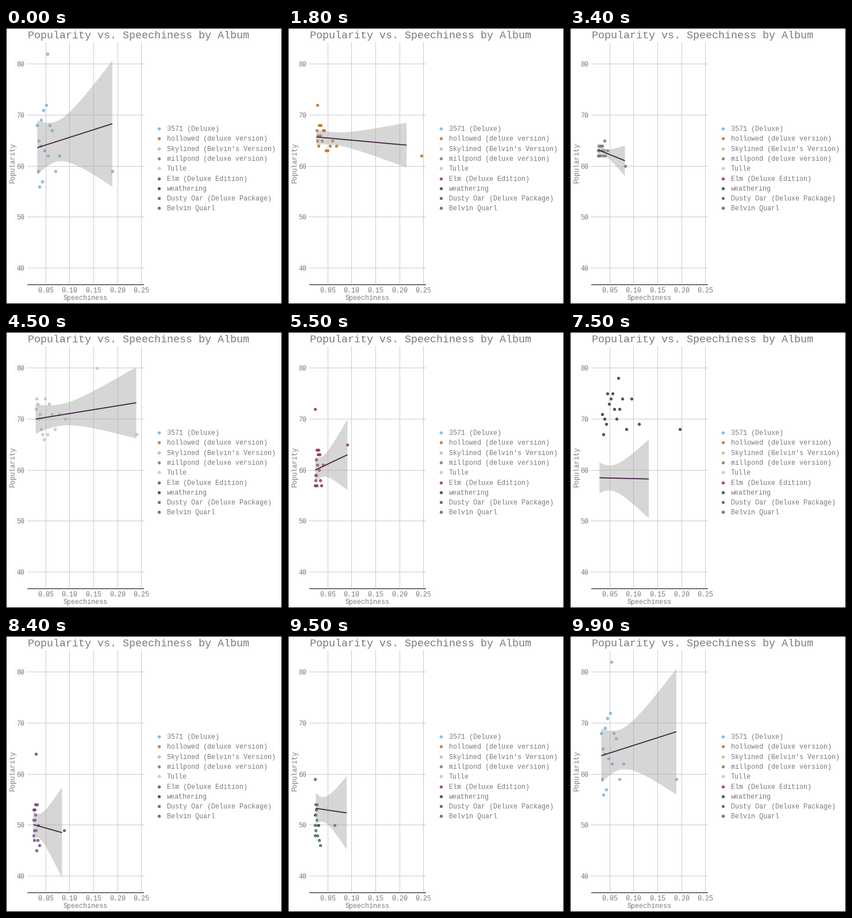
Animation of 480 by 480 pixels, one loop 10 s. Source, as a matplotlib script:

```python
import numpy as np
import matplotlib as mpl
import matplotlib.pyplot as plt
from matplotlib.animation import FuncAnimation
from matplotlib.colors import to_rgb
from matplotlib.patches import Polygon

SIZE, DPI = 480, 72
FRAMES, STEP = 100, 100
ROWS, TRACKS = 80, 17
LEFT, RIGHT, TOP, BOTTOM = 37, 240, 25, 446
TEXT, GRID, LINE = "#807680", "#cbcbcb", "#432147"

mpl.rcParams["font.family"] = "Liberation Mono"
rng = np.random.default_rng(8)


def px(speech):
    return 69.3 + (np.asarray(speech) - 0.05) * 832


def py(pop):
    return 62.7 + (80 - np.asarray(pop)) * 8.87


albums = []


def album(name, color, start, peak, end, trend, mean, waist, half):
    """Add a trend with its confidence band and seeded dots around it.

    start: lowest speechiness; peak, end: highest and rightmost dot;
    trend: popularity at both ends of the line; mean: where the band is
    narrowest, as a share of its width; waist, half: half height of the
    band there and at the right end.
    """
    width = end[0] - start
    u = np.linspace(0, 1, ROWS)
    mid = trend[0] + (trend[1] - trend[0]) * u
    reach = (u - mean) / (1 - mean)
    band = np.sqrt(waist**2 + (half**2 - waist**2) * reach**2)
    fit = np.array([start + width * u, mid, mid - band, mid + band])

    # exponential crowd near the left end, popularity in whole numbers
    crowd = -np.log(1 - np.linspace(0, 0.88, TRACKS - 2))
    x = start + 0.6 * mean * width * crowd
    sd = waist * np.sqrt(TRACKS) / 2.13
    noise = rng.permutation(np.linspace(-1, 1, len(x))) * sd
    y = np.minimum(np.round(np.interp(x, fit[0], mid) + noise), peak[1])
    albums.append(dict(name=name, color=color, fit=fit,
                       x=np.r_[x, peak[0], end[0]],
                       y=np.r_[y, peak[1], end[1]]))


album("3571 (Deluxe)", "#7fc0ea", 0.032, (0.0535, 82), (0.189, 59),
      trend=(63.6, 68.3), mean=0.235, waist=3.95, half=12.35)
album("hollowed (deluxe version)", "#cd7a1c", 0.0263, (0.0275, 72),
      (0.245, 62), trend=(65.7, 63.4), mean=0.15, waist=1.2, half=4.3)
album("Skylined (Belvin's Version)", "#e0c78a", 0.0245, (0.0312, 76),
      (0.0628, 70), trend=(65.7, 67.6), mean=0.25, waist=1.3, half=4.9)
album("millpond (deluxe version)", "#808080", 0.025, (0.039, 65),
      (0.0815, 60), trend=(63.2, 61.05), mean=0.27, waist=0.75, half=3)
album("Tulle", "#d8cdec", 0.0287, (0.157, 80), (0.239, 67),
      trend=(70, 73.2), mean=0.23, waist=2.1, half=7)
album("Elm (Deluxe Edition)", "#9c2f50", 0.0235, (0.0235, 72), (0.091, 65),
      trend=(60, 63), mean=0.19, waist=2, half=6.95)
album("weathering", "#383838", 0.0345, (0.068, 78), (0.1957, 68),
      trend=(71.3, 72.8), mean=0.37, waist=2.1, half=4.9)
album("Dusty Oar (Deluxe Package)", "#7840a0", 0.0242, (0.029, 64),
      (0.0887, 49), trend=(49.95, 48.55), mean=0.15, waist=2.4, half=9.65)
album("Belvin Quarl", "#427350", 0.023, (0.023, 59), (0.0645, 50),
      trend=(50.7, 48.4), mean=0.2, waist=2.05, half=5.9)

# (first frame, steps) of the change away from each album
CHANGES = [(6, 6), (18, 6), (30, 5), (41, 5), (51, 5),
           (62, 5), (73, 5), (84, 5), (95, 5)]

fig = plt.figure(figsize=(SIZE / DPI, SIZE / DPI), dpi=DPI, facecolor="white")
ax = fig.add_axes([0, 0, 1, 1])
ax.set(xlim=(0, SIZE), ylim=(SIZE, 0))
ax.axis("off")


def rule(xs, ys, color):
    ax.plot(xs, ys, color=color, lw=1, snap=False, solid_capstyle="butt",
            solid_joinstyle="miter", zorder=1)


def label(x, y, text, size=11.67, **kw):
    ax.text(x, y, text, size=size, color=TEXT, va="baseline", **kw)


def paint(mark, color):
    rgb = np.array(to_rgb(color))
    mark.set_markerfacecolor((*rgb, 0.8))
    mark.set_markeredgecolor((*(rgb * 0.8), 0.8))


def dots(color, x=(), y=()):
    mark, = ax.plot(x, y, "o", ms=4.2, mew=1, zorder=2)
    paint(mark, color)
    return mark


for pop in range(40, 90, 10):
    y = int(py(pop)) + 0.5
    rule([LEFT, RIGHT], [y, y], GRID)
    label(32.5, y + 4.5, str(pop), ha="right")
for k in range(1, 6):
    x = int(px(k / 20)) + 0.5
    rule([x, x], [TOP, BOTTOM], GRID)
    label(x, 460.5, f"{k / 20:.2f}", ha="center")
rule([LEFT, RIGHT], [BOTTOM + 0.5] * 2, "black")
edge = SIZE - 0.5
rule([0.5, edge, edge, 0.5, 0.5], [0.5, 0.5, edge, edge, 0.5], "black")

label(37.5, 18, "Popularity vs. Speechiness by Album", 18.33)
label(138.5, 473.5, "Speechiness", ha="center")
label(15, 235.5, "Popularity", ha="center", rotation=90,
      rotation_mode="anchor")
for k, a in enumerate(albums):
    y = 175.2 + 17.28 * k
    dots(a["color"], [265.5], [y])
    label(280, y + 4, a["name"])

points = dots("black")
ribbon = Polygon([(0, 0)] * 3, closed=True, fc=(0.6, 0.6, 0.6, 0.4), lw=0,
                 zorder=3)
ax.add_patch(ribbon)
line, = ax.plot([], [], color=LINE, lw=1.8, solid_capstyle="butt", zorder=4)


def state(i):
    """Index of the shown album and progress towards the next one."""
    for k, (start, steps) in enumerate(CHANGES):
        t = max(0, (i - start + 1) / steps)
        if t < 1:
            return k, t
    return 0, 0


def draw(i):
    k, t = state(i)
    now, nxt = albums[k], albums[(k + 1) % len(albums)]
    x, mid, low, high = (1 - t) * now["fit"] + t * nxt["fit"]
    points.set_data(px(now["x"]), py(now["y"]))
    paint(points, now["color"])
    gx = px(x)
    line.set_data(gx, py(mid))
    ribbon.set_xy(np.column_stack([np.r_[gx, gx[::-1]],
                                   np.r_[py(high), py(low)[::-1]]]))
    return points, ribbon, line


anim = FuncAnimation(fig, draw, frames=FRAMES, interval=STEP, repeat=True,
                     repeat_delay=0)
plt.show()
```
